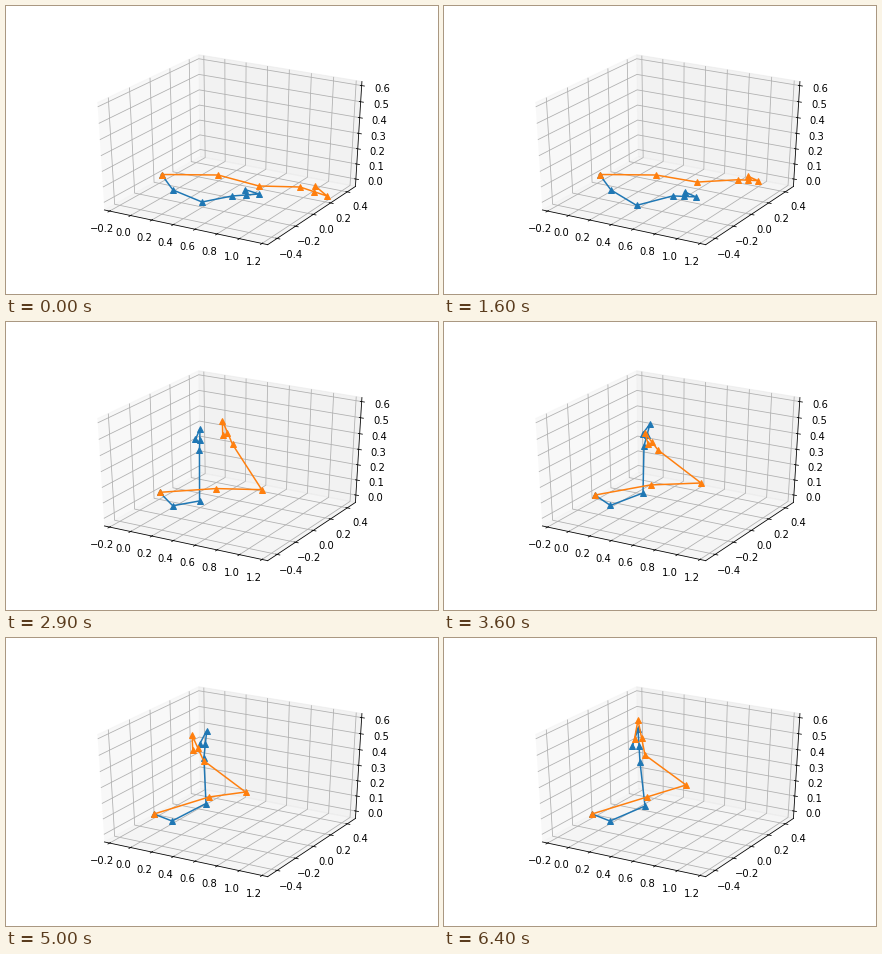
These frames come from a looping animation (432x288 px, 6.5 s). A matplotlib script:

```python
import math

import matplotlib.pyplot as plt
import numpy as np
from matplotlib.animation import FuncAnimation

W, H, DPI = 432, 288, 72
FRAMES, STEP = 65, 100

# Key poses as elbow, wrist, fingertip; a stage point is x + y*1j
TIMES = [0, 900, 2300, 3600, 6400]
LEFT = [
    (196 + 196j, 226 + 190j, 253 + 188j),
    (193 + 200j, 229 + 194j, 252 + 198j),
    (186 + 190j, 184 + 134j, 178 + 115j),
    (199 + 171j, 200 + 124j, 206 + 102j),
    (201 + 168j, 196 + 124j, 194 + 91j),
]
RIGHT = [
    (253 + 180j, 294 + 181j, 321 + 190j),
    (253 + 176j, 293 + 178j, 312 + 181j),
    (254 + 177j, 249 + 124j, 247 + 90j),
    (257 + 161j, 214 + 128j, 201 + 111j),
    (242 + 147j, 201 + 117j, 194 + 82j),
]
EASE = [1, 4, 0.7, 1]    # the arms hang first, then whip up


def mix(a, b, u):
    return a + (b - a) * u


def swing(a, b, u):
    """Turn and stretch vector a into vector b."""
    return a * (b / a) ** u


def lean(ms):
    """Share of the body's lean, 0 before the arms go up, 1 after."""
    u = min(max((ms - 2000) / 2800, 0), 1)
    return u * u * (3 - 2 * u)


def arm(keys, shoulder, sway, drift, ms):
    """Seven joints: spine, shoulder, elbow, wrist, hand, tip, thumb."""
    i = min(int(np.searchsorted(TIMES, ms, side="right")) - 1, len(EASE) - 1)
    phase = (ms - TIMES[i]) / (TIMES[i + 1] - TIMES[i])
    u = phase ** EASE[i]
    (e0, w0, t0), (e1, w1, t1) = keys[i], keys[i + 1]

    elbow = mix(e0, e1, u)
    if i == len(EASE) - 1:
        elbow += sway * math.sin(2 * math.pi * phase)
        elbow += drift * math.sin(math.pi * phase)
    wrist = elbow + swing(w0 - e0, w1 - e1, u)
    hand = swing(t0 - w0, t1 - w1, u)
    tip = wrist + hand
    thumb = tip - hand * (0.5 + 0.2j)

    k = lean(ms)
    spine = mix(155.5 + 168.5j, 148 + 176j, k)
    joints = np.array([spine, mix(*shoulder, k), elbow, wrist,
                       wrist + hand / 2, tip, thumb])
    return joints.real, joints.imag


fig = plt.figure(figsize=(W / DPI, H / DPI), dpi=DPI, facecolor="white")
fig.subplots_adjust(left=0.125, right=0.9, bottom=0.125, top=0.88)
ax = fig.add_subplot(projection="3d")
# Let the cube stretch to the whole subplot instead of a square
ax.apply_aspect = lambda position=None: None
ax.set_box_aspect((1, 1, 1), zoom=math.sqrt(3) / 1.8294640721620434)
ax.view_init(elev=30, azim=-60)
ax.set(xlim=(-0.25, 1.25), ylim=(-0.5, 0.5), zlim=(-0.05, 0.625))
ax.set_xticks(np.arange(-1, 7) * 0.2)
ax.set_yticks(np.arange(-2, 3) * 0.2)
ax.set_zticks(np.arange(0, 7) * 0.1)

stage = fig.add_axes([0, 0, 1, 1])
stage.set(xlim=(0, W), ylim=(H, 0))
stage.axis("off")

left, = stage.plot([], [], "-^", color="C0", lw=1.5, ms=6)
right, = stage.plot([], [], "-^", color="C1", lw=1.5, ms=6)


def update(n):
    ms = n * STEP
    left.set_data(*arm(LEFT, (167 + 184j, 166 + 183j), -3 + 5j, -4j, ms))
    right.set_data(*arm(RIGHT, (212 + 169j, 203 + 159j), -2.5 - 8j, -10, ms))
    return left, right


anim = FuncAnimation(fig, update, frames=FRAMES, interval=STEP,
                     init_func=lambda: update(0), repeat=True, repeat_delay=0)
plt.show()
```
